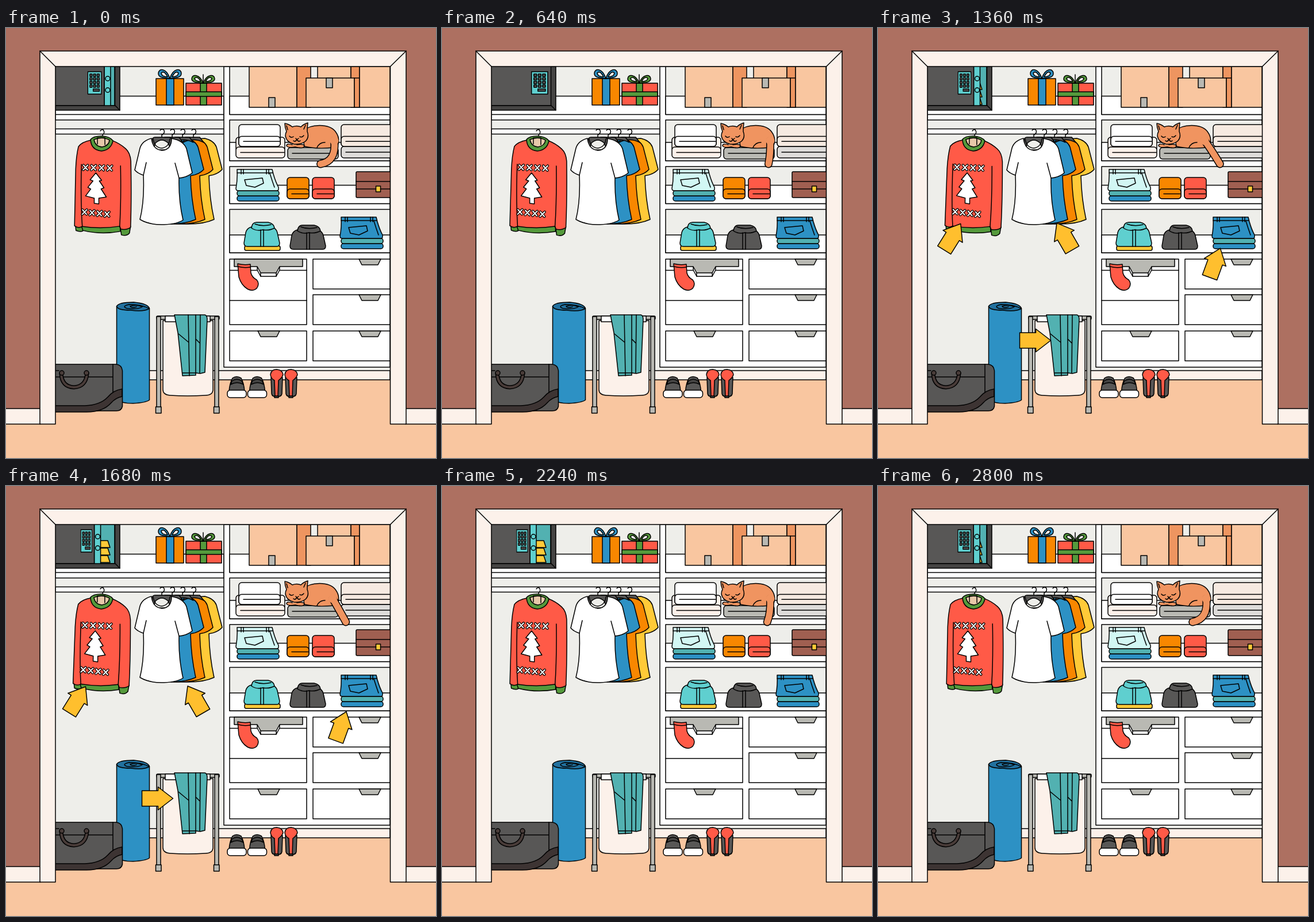
Recreate the animation shown at these times as an HTML page. Size 748 by 748 pixels, loop 2.88 s.

```html
<!DOCTYPE html>
<html lang="en">
<head>
<meta charset="utf-8">
<title>Closet</title>
<style>
html, body { margin: 0; width: 100%; height: 100%; overflow: hidden; background: #ad7061; }
svg { display: block; width: 100vw; height: 100vh; }
</style>
</head>
<body>
<svg id="stage" viewBox="0 0 748 748" stroke="#000" stroke-width="1.5" stroke-linejoin="round" stroke-linecap="round"></svg>
<script>
const LOOP = 2880;
const C = {
  wall: '#ad7061', floor: '#f9c6a0', cream: '#fcf1ea', back: '#eeeeea', white: '#fff',
  dark: '#585756', deep: '#454443', gray: '#b9b9b3', blue: '#2d91c4', teal: '#52b1b1',
  aqua: '#5fcfcf', ice: '#d2f7f4', red: '#ff5a47', orange: '#f88700', yellow: '#ffca38',
  green: '#559a3c', box: '#f9c6a0', side: '#ee9560', cat: '#f09460', arrow: '#ffbf2e'
};
const path = (d, fill = 'none', more = '') => `<path d="${d}" fill="${fill}" ${more}/>`;
const rect = (x, y, w, h, fill, rx = 0, more = '') =>
  `<rect x="${x}" y="${y}" width="${w}" height="${h}" rx="${rx}" fill="${fill}" ${more}/>`;
const oval = (x, y, rx, ry, fill = 'none', more = '') =>
  `<ellipse cx="${x}" cy="${y}" rx="${rx}" ry="${ry}" fill="${fill}" ${more}/>`;
const group = (body, more = '') => `<g ${more}>${body}</g>`;
const at = (x, y, body) => group(body, `transform="translate(${x} ${y})"`);
const bare = 'stroke="none"';

// Rolled cloth with a slit, and a block of cloth whose lower half is rolled
const roll = (x, y, w, h, fill) => rect(x, y, w, h, fill, 5) + path(`M${x + w - 1} ${y + h / 2}H${x + 8}`);
const fold = (x, y, w, h, fill) => rect(x, y, w, h, fill, 5) + roll(x, y + h * .54, w, h * .46, fill);

function room() {
  let s = rect(0, 0, 748, 748, C.wall, 0, bare) +
    rect(0, 689, 748, 59, C.floor, 0, bare) +
    rect(-2, 662, 62, 27, C.cream) + rect(695, 662, 60, 27, C.cream) +
    rect(86, 67, 582, 545, C.back, 0, bare) +
    rect(86, 612, 582, 90, C.floor, 0, bare) +
    rect(86, 596, 582, 16, C.cream) +
    rect(86, 118.500, 293, 41.500, C.white) + path('M86 150.500H379') +
    rect(86, 175.500, 293, 9, C.white) +
    rect(379, 67, 289, 523, C.white);
  for (const [top, bottom, rear] of [[67, 150.5, 118.5], [160, 231, 199], [241, 305.5, 273.5], [315.5, 391, 360]])
    s += rect(389, top, 279, bottom - top, C.back) + rect(389, rear, 279, bottom - rear, C.white);
  return s;
}

function drawers() {
  const handle = (x, y) => path(`M${x} ${y}h38l-5 10h-28z`, C.gray);
  let s = '';
  for (const [x, y, hx] of [[534, 402, 614], [534, 464, 614], [534, 527, 614], [389, 527, 438]])
    s += rect(x, y, 134, 52, C.white) + handle(hx, y);
  s += rect(389, 402, 134, 114, C.white) + path('M389 421.500H523M389 474H523') +
    path('M437 415V421L443 432H470L476 421V415Z', C.white) +
    path('M397 402H516V415H476L470 426H443L437 415H397Z', C.gray) + path('M443 426V432M470 426V432');
  return s + path('M403 410Q414 413 425 411L426 426Q428 434 436 438Q442 445 436 453Q429 459 420 454Q409 447 405 433Z', C.red) +
    path('M404 415Q414 418 425 416');
}

function safe() {
  let keys = rect(155, 76, 28, 39, C.aqua);
  for (let i = 0; i < 12; i++)
    keys += rect(159 + i % 3 * 7.5, 80 + (i / 3 | 0) * 6.3, 5, 4.300, C.dark, .6);
  keys += rect(166, 106, 13, 4, C.dark);
  let gold = '';
  for (let i = 0; i < 3; i++) gold += path(`M160 ${133 - 13 * i}v-12h17l4 12z`, C.yellow);
  return rect(86, 67, 112, 76, C.deep) + path('M190 135L198 143') +
    `<clipPath id="hole"><rect x="86" y="67" width="103" height="68"/></clipPath>` +
    group(rect(86, 67, 103, 68, C.teal) + gold +
      group(rect(0, 66, 11, 70, C.aqua) + oval(6, 88, 4, 4, C.aqua) + oval(6, 108, 4, 4, C.aqua), 'id="edge"') +
      group(rect(70, 66, 119, 69, C.dark, 0, 'vector-effect="non-scaling-stroke"') + keys, 'id="door"'),
      'clip-path="url(#hole)"') + path('M86 135H189.500V67');
}

function bow(x, y, w, h, fill) {
  const loop = k => path(`M${x} ${y}C${x + k * w * .3} ${y - h * 1.2} ${x + k * w} ${y - h * 1.15} ${x + k * w} ${y - h * .55}` +
    `C${x + k * w} ${y - h * .05} ${x + k * w * .45} ${y - h * .1} ${x} ${y}Z`, fill) +
    path(`M${x + k * 4} ${y - 3}Q${x + k * w * .5} ${y - h * .95} ${x + k * w * .75} ${y - h * .6}Q${x + k * w * .7} ${y - h * .2} ${x + k * 4} ${y - 3}`, C.back);
  return loop(-1) + loop(1);
}

function topShelf() {
  return rect(261, 88, 48, 46, C.orange) + rect(279, 88, 13, 46, C.blue) + bow(285, 88, 20, 16, C.blue) +
    rect(313, 96, 62, 38, C.red) + rect(338, 96, 11, 38, C.green) +
    rect(313, 111, 62, 8, C.green) + bow(343, 96, 20, 14, C.green) + path('M343 96V81') +
    rect(423, 67, 83, 71, C.box) + rect(506, 67, 24, 71, C.side) +
    rect(542, 67, 58, 40, C.box) + rect(600, 67, 15, 71, C.side) +
    rect(522, 87, 84, 51, C.box) + rect(606, 87, 9, 51, C.side) + rect(615, 67, 53, 71, C.box) +
    rect(457, 121, 11, 17, C.gray) + rect(557, 87, 11, 17, C.gray);
}

function cat() {
  return roll(490, 208, 88, 20, C.gray) +
    path('M515 180C530 166 562 166 573 180C582 192 580 207 570 208Q540 211 519 206Z', C.cat) +
    path('M541 208Q545 199 555 199') +
    group('<path id="tailLine" fill="none" stroke-width="14"/><path id="tail" fill="none" stroke-width="11" stroke="' + C.cat + '"/>' +
      '<circle id="rump" r="7.600" stroke="none" fill="' + C.cat + '"/>') +
    path('M498 203Q488 200 488 205Q490 209 503 207Q518 211 519 205Q517 201 506 203', C.cat) +
    path('M485 166Q492 167 498 172Q506 169 513 172Q518 167 525 165Q524 173 524 180Q528 190 521 197Q513 203 501 202Q488 199 486 188Q486 183 488 180Q485 173 485 166Z', C.cat) +
    path('M488 170L490 177M521 169L518 176M493 188Q496 192 500 189M511 189Q515 191 518 187M504 192L506 194L509 192M506 194Q503 199 500 196M506 194Q509 199 512 196');
}

function jeans(x, y, colors) {
  const [a, b, c] = colors;
  return at(x, y, rect(2, 46, 73, 9, c, 4) + rect(2, 37, 73, 9, b, 4) +
    path('M2 0H63L65 8Q69 22 74 31Q75 38 70 37H4Q0 37 0 33Q3 18 2 0Z', a) +
    path('M2 6H64M9 0V8M13 0V8M53 0V8M57 0V8M59 7Q63 20 67 31') +
    path('M15 18L46 15L48 24L33 31L18 28Z', a));
}

function shirt(x, y, fill) {
  return at(x, y, path('M13 8Q5 10 3 18L0 36Q0 42 6 42H57Q62 42 62 36L58 18Q56 10 48 8Z', fill) +
    path('M13 10Q14 0 22 0H42Q52 2 53 10Q44 15 33 13Q22 16 13 10Z', fill) +
    path('M19 3Q32 8 47 4M29 13V42M34 13V42'));
}

function shelves() {
  return rect(400, 190, 85, 24, C.cream, 5) + roll(400, 207, 85, 19, C.cream) + fold(405, 168, 72, 38, C.white) +
    roll(583, 206, 100, 20, '#dedcda') + fold(583, 168, 100, 38, '#f6eae1') + cat() +
    jeans(400, 246, [C.ice, C.teal, C.blue]) +
    fold(489, 260, 38, 37, C.orange) + fold(533, 260, 38, 37, C.red) +
    rect(609, 250, 70, 45, '#a05f51', 2) + path('M609 267H670M609 280H670') + rect(643.500, 275, 8, 10, C.yellow) +
    rect(415, 379, 62, 8, C.yellow, 3) + shirt(414, 338, C.aqua) + shirt(494, 343, C.dark) +
    jeans(581, 329, [C.blue, C.teal, C.blue]);
}

function hook(x) {
  return path(`M${x} 190V186Q${x + 6} 183 ${x + 4} 178Q${x + 1} 174 ${x - 3} 178`);
}

function shirts() {
  const rear = (x, fill) => path(`M${x - 64} 194L${x - 30} 192Q${x - 14} 196 ${x - 10} 207L${x} 246Q${x - 8} 255 ${x - 23} 257` +
    `Q${x - 22} 298 ${x - 14} 333Q${x - 38} 344 ${x - 80} 340Z`, fill);
  return rear(376, C.yellow) + rear(360, C.orange) + rear(344, C.blue) +
    [308, 290, 272].map(x => path(`M${x} 199L${x + 4} 190H${x + 29}L${x + 36} 199Q${x + 18} 190 ${x} 199Z`, C.dark)).join('') +
    [271, 289, 307, 326].map(hook).join('') +
    rect(254, 190, 34, 20, C.dark, 5) + path('M260 200Q271 190 282 200L287 212H256Z', C.back) +
    path('M253 192Q237 196 233 209L224 247Q229 253 239 256Q241 301 233 333Q250 343 275 342Q298 341 308 334Q300 300 301 261Q315 260 324 252L314 210Q309 196 288 192Q288 212 271 213Q255 211 253 192Z', C.white) +
    path('M256 193Q258 208 271 209Q284 207 285 193M244 234L239 256M294 235L301 261');
}

function sweater() {
  const marks = (x, y, gap, drop) => [0, 1, 2, 3]
    .map(i => `M${x + i * gap - 3.5} ${y + i * drop - 4}l7 8m.500 -8l-8 8`).join('');
  const rows = marks(138, 242.5, 14, .4) + marks(136, 320, 13, 1.3);
  return path('M168 190V186Q173 182 169 177Q166 176 164 179') +
    group(
      path('M120 342L121 352Q128 355 133 353L135 340ZM198 346L200 360Q209 363 214 357L216 345Z', C.green) +
      path('M130 342L133 352Q164 360 198 354V343Z', C.green) +
      path('M148 195Q132 198 126 206Q122 222 121 245L118.500 344Q125 349 132 345Q164 350 197 345L199 350Q209 352 216 347Q218 300 217 232Q216 217 208 210Q198 201 185 196Z', C.red) +
      path('M131 237Q129 300 132 345M199 240Q200 300 197 346') +
      path('M147 194Q148 212 166 214Q183 212 186 196Q181 189 166 188Q152 188 147 194Z', C.green) +
      path('M153 194Q155 206 167 207Q179 205 180 195Q168 188 153 194Z', '#e7c8a9') +
      path('M159 202V191H172V203') +
      path(rows, 'none', 'stroke-width="4.500"') + path(rows, 'none', 'stroke="#fff" stroke-width="2"') +
      path('M156 252L166 265L162 266L170 278L165 280L174 294L161 296V306L153 305V296L138 292L147 280L142 277L151 266L146 264Z', C.white),
      'id="sweater"');
}

function floorItems() {
  const shoe = x => at(x, 606, path('M3 26Q4 12 9 3Q16 -2 24 3Q29 12 30 26Z', C.dark) +
    path('M8 8Q17 2 25 8L28 14Q17 8 6 14Z', C.deep) + rect(0, 24, 33, 13, C.white, 5));
  const heel = x => at(x, 594, path('M1 14L2 42Q3 47 8 47H14Q19 47 20 42L21 14Z', C.dark) +
    path('M0 9Q1 0 11 0Q21 1 22 9Q20 15 14 19L13 47H8L7 19Q1 16 0 9Z', C.red) + rect(7, 46, 7, 3, C.deep));
  const leg = x => rect(x, 502, 7, 158, C.gray) + rect(x - 1.5, 659, 9.500, 11, C.gray);
  return path('M192.500 484V646Q200 653 221 653Q243 652 249.500 647V488Z', C.blue) +
    path('M192.500 484Q196 477 222 477Q247 479 249.500 488Q240 494 217 491Q194 491 192.500 484Z', '#22719f') +
    path('M249 488Q236 481 214 481Q200 484 211 488Q230 490 237 485Q227 480 216 484Q218 488 227 485') +
    path('M80 585H192Q201 586 202.500 596V658Q201 666 192 666H80Z', C.dark) +
    path('M80 607H186M186 585V640M86 596H92') +
    path('M80 657H137Q164 656 177 642Q187 630 202 628V641Q191 643 183 652Q169 668 140 668H80Z', '#3d3433') +
    path('M96 601Q97 624 118 625Q139 624 141 601', 'none', 'stroke-width="7"') +
    path('M96 601Q97 624 118 625Q139 624 141 601', 'none', 'stroke="#493c39" stroke-width="4"') +
    oval(97, 600, 4, 4, '#493c39') + oval(140, 600, 4, 4, '#493c39') +
    path('M273 509H360V630Q359 639 347 639Q316 641 285 639Q273 638 273 629Z', C.cream) +
    rect(262, 501, 109, 6, C.gray, 2) + leg(262) + leg(363) + rect(277, 501, 78, 10, C.white) +
    path('M293 499H346Q350 500 350 507L346 599L338 601L330 600V604L307 605L299 530Z', C.teal) +
    path('M317 499L319 605M330 499V600M338 499L337 600M300 532L318 547M330 541L337 548M307 600H330') +
    shoe(385) + shoe(420.500) + heel(460) + heel(485);
}

function frame() {
  return path('M59 689V40H696V689H668.500V67H86V689Z', C.cream) + path('M59 40L86 67M696 40L668.500 67');
}

// Tip position when drawn back, heading in degrees
const ARROWS = [[138.5, 349, -58], [316, 348, -120], [592, 392.5, -70], [290.5, 543.5, 0]];
const arrows = () => group(ARROWS.map(() =>
  path('M0 0L-26 -20V-13.500H-54V13.500H-26V20Z', C.arrow, 'class="arrow"')).join(''), 'id="arrows"');

const stage = document.getElementById('stage');
stage.innerHTML = room() + drawers() + safe() + topShelf() + shelves() + shirts() + sweater() +
  floorItems() + frame() + arrows();

const el = id => document.getElementById(id);
const pointers = [...document.querySelectorAll('.arrow')];
const place = (node, value) => node.setAttribute('transform', value);
const ease = k => (1 - Math.cos(Math.PI * Math.min(1, Math.max(0, k)))) / 2;

function draw(t) {
  const swing = Math.cos((t - 1420) / LOOP * 2 * Math.PI);

  // The safe opens, rests, and finishes closing after the loop wraps
  const s = t < 700 ? t + LOOP : t;
  const open = ease((s - 800) / 955) - ease((s - 2413) / 955);
  const x = 190 - 37 * open, k = (x - 76) / 113;
  place(el('door'), `translate(${76 * (1 - k)} 0) scale(${k} 1)`);
  place(el('edge'), `translate(${x} 0)`);

  place(el('sweater'), `rotate(${.25 + swing * .5} 167 186)`);

  const sx = 571 - 3 * Math.max(0, swing), sy = 196;
  const d = `M${sx} ${sy}Q${571 + 4 * Math.abs(swing)} ${218 - 14 * swing} ${571 + 24 * swing} 236.500`;
  el('tailLine').setAttribute('d', d);
  el('tail').setAttribute('d', d);
  el('rump').setAttribute('cx', sx);
  el('rump').setAttribute('cy', sy);

  el('arrows').setAttribute('visibility', t >= 720 && t < 2160 ? 'visible' : 'hidden');
  const push = 5 - 5 * Math.cos((t - 1040) / 640 * 2 * Math.PI);
  pointers.forEach((node, i) => {
    const [ax, ay, turn] = ARROWS[i];
    place(node, `translate(${ax} ${ay}) rotate(${turn}) translate(${push} 0)`);
  });
}

const start = performance.now();
function tick() {
  draw((performance.now() - start) % LOOP);
  requestAnimationFrame(tick);
}
draw(0);
requestAnimationFrame(tick);
</script>
</body>
</html>
```
